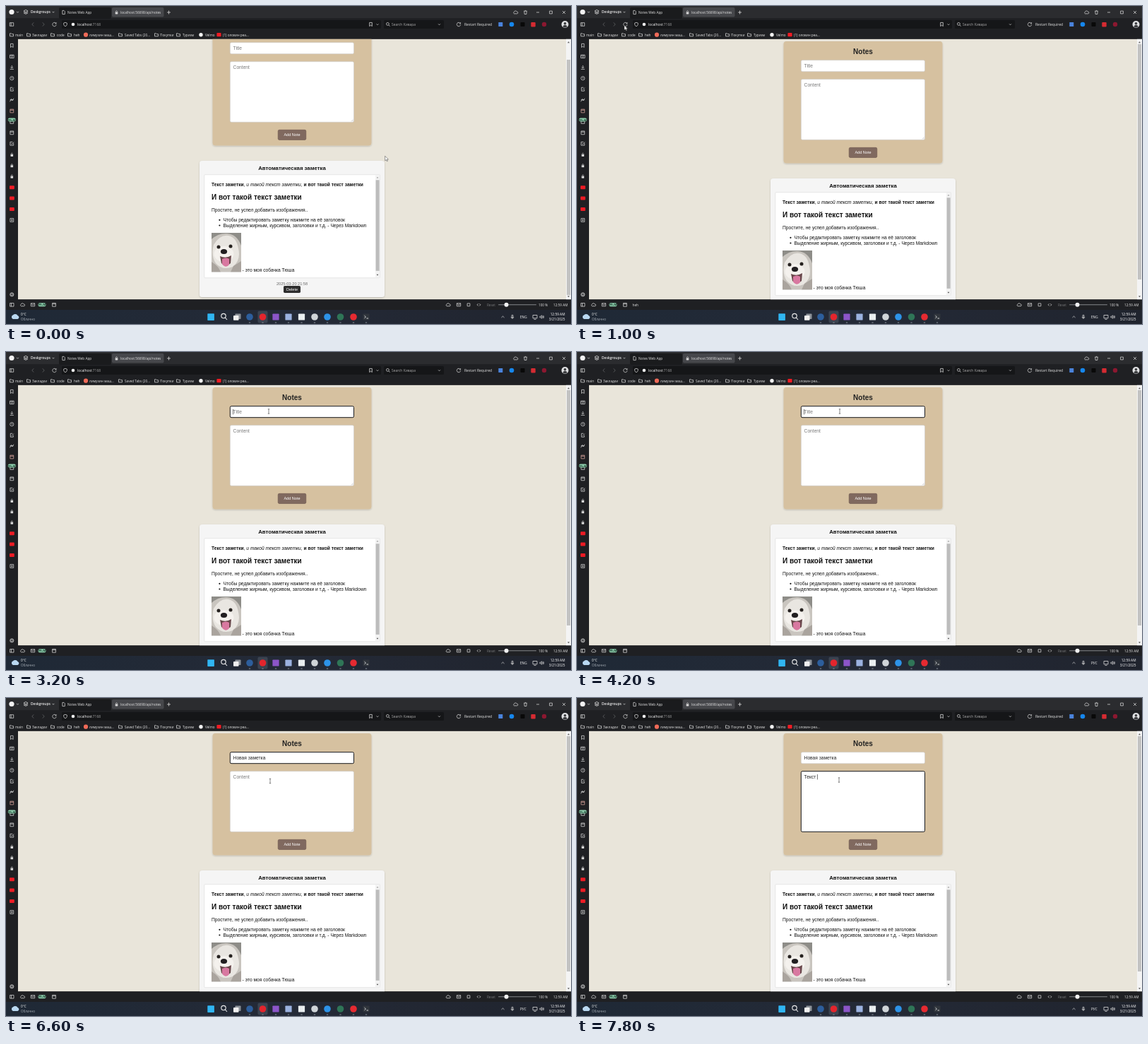
These frames come from a looping animation (800x450 px, 8 s). An HTML page:

```html
<!DOCTYPE html>
<html lang="ru">
<head>
<meta charset="utf-8">
<title>Notes Web App</title>
<style>
  html, body { margin: 0; width: 100%; height: 100%; overflow: hidden; background: #1e1f22; }
  svg { display: block; width: 100vw; height: 100vh; }
  text { white-space: pre; }
  .ui { font-family: "Open Sans", "Noto Sans", sans-serif; }
  .pg { font-family: "Liberation Sans", Arial, sans-serif; }
</style>
</head>
<body>
<svg id="stage" viewBox="0 0 800 450"></svg>
<script>
const LOOP = 8000, STEP = 200;
const stage = document.getElementById('stage');
const INK = '#d8d8d8';

const rect = (x, y, w, h, fill, r = 0, more = '') =>
  `<rect x="${x}" y="${y}" width="${w}" height="${h}" fill="${fill}" rx="${r}" ${more}/>`;
const dot = (x, y, r, fill, more = '') => `<circle cx="${x}" cy="${y}" r="${r}" fill="${fill}" ${more}/>`;
const line = (d, color = INK, w = 0.8, more = '') =>
  `<path d="${d}" fill="none" stroke="${color}" stroke-width="${w}" ${more}/>`;
const text = (cls, x, y, size, fill, str, more = '') =>
  `<text class="${cls}" x="${x}" y="${y}" font-size="${size}" fill="${fill}" ${more}>${str}</text>`;
const ui = (x, y, str, size = 4.75, fill = '#e4e4e4', more = '') => text('ui', x, y, size, fill, str, more);
const pg = (x, y, str, size = 6.667, fill = '#111', more = '') => text('pg', x, y, size, fill, str, more);
const BOLD = 'font-weight="bold"', MID = 'text-anchor="middle"';

// Small outline icons, centred on 0,0
const shapes = {
  folder: 'M-2.5 2V-2H-.5L.3-1.1H2.5V2Z',
  mark: 'M-1.8-2.6H1.8V2.6L0 1.1-1.8 2.6Z',
  panel: 'M-2.7-2.3H2.7V2.3H-2.7ZM-.8-2.3V2.3',
  book: 'M-2.8-2.2H2.8V2.2H-2.8ZM0-2.2V2.2M-1.9-.8H-.9M.9-.8H1.9',
  down: 'M0-2.8V1M-1.8-.6L0 1.2 1.8-.6M-2.6 2.6H2.6',
  clock: 'M2.6 0A2.6 2.6 0 1 1-2.6 0 2.6 2.6 0 1 1 2.6 0M0-1.5V0L1 .7',
  edit: 'M1-2.4H-2V2.6H2V.2M-.4 1L2.6-2',
  wave: 'M-2.8 2.2L-.8-1.6.4.9 2.6-2.4M-2.6-.3H2.4',
  box: 'M-2.4-2.4H2.4V2.4H-2.4ZM-2.4-1.1H2.4',
  mail: 'M-2.7-2H2.7V2H-2.7ZM-2.7-2L0 .5 2.7-2',
  check: 'M2.4-.5V2.4H-2.4V-2.4H1M-1.2-.3L0 1 2.8-2.2',
  plus: 'M-2.4-2.4H2.4V2.4H-2.4ZM0-1.3V1.3M-1.3 0H1.3',
  cloud: 'M-2 1.9A1.5 1.5 0 0 1-1.9-.8 2 2 0 0 1 1.8-.9 1.4 1.4 0 0 1 2 1.9Z',
  bin: 'M-2.3-1.8H2.3M-1.7-1.8L-1.4 2.5H1.4L1.7-1.8M-.7-2.6H.7',
  lens: 'M1.3-.6A1.9 1.9 0 1 1-2.5-.6 1.9 1.9 0 1 1 1.3-.6M.8.9L2.6 2.7',
  shield: 'M0-2.7L2.3-1.9V.2Q2 2 0 2.8-2 2-2.3.2V-1.9Z',
  back: 'M1.2-2.6L-1.2 0 1.2 2.6',
  next: 'M-1.2-2.6L1.2 0-1.2 2.6',
  reload: 'M2.3-1.4A2.7 2.7 0 1 0 2.7.4M2.6-2.8V-1.1H.8',
  cross: 'M-2-2L2 2M2-2L-2 2',
  square: 'M-1.9-1.9H1.9V1.9H-1.9Z',
  min: 'M-2 0H2',
  caret: 'M-1.4-.6L0 .8 1.4-.6',
  up: 'M-2 .9L0-1 2 .9',
  code: 'M-.8-1.6L-2.4 0-.8 1.6M.8-1.6L2.4 0 .8 1.6',
  layers: 'M0-2.6L3-1 0 .6-3-1ZM-3 .5L0 2.1 3 .5M-3 1.9L0 3.4 3 1.9',
  page: 'M-1.6-2.6H.6L1.8-1.4V2.6H-1.6Z',
  mic: 'M-.9-2.6H.9V.4H-.9ZM-1.9 0Q-1.8 1.7 0 1.7 1.8 1.7 1.9 0M0 1.7V2.8',
  sound: 'M-2.6-.8H-1.4L.2-2.2V2.2L-1.4.8H-2.6ZM1.3-1.3Q2.2 0 1.3 1.3M2.3-2.1Q3.7 0 2.3 2.1',
  gear: 'M1.5 0A1.5 1.5 0 1 1-1.5 0 1.5 1.5 0 1 1 1.5 0M2.6 0A2.6 2.6 0 1 1-2.6 0 2.6 2.6 0 1 1 2.6 0'
};
const icon = (name, x, y, color = INK, w = 0.75) => line(shapes[name], color, w, `transform="translate(${x} ${y})"`);
const lock = (x, y) => rect(x - 1.8, y - .6, 3.6, 3, INK, .4) + line(`M${x - 1} ${y - .5}V${y - 1.6}Q${x} ${y - 3.2} ${x + 1} ${y - 1.6}V${y - .5}`, INK, .7);
const badge = (x, y) => rect(x - 5.5, y - 2.5, 11, 5, '#8fd0ae', 2.2) + ui(x, y + 1.5, '99+M', 4, '#16382a', `${MID} ${BOLD}`);

function topBar() {
  const marks = [[8, 13, 'main'], [32, 37, 'Закладки'], [66, 72, 'code'], [90, 96, 'heh'], [162, 168, 'Saved Tabs (20...'],
    [213, 218, 'Покупки'], [244, 250, 'Туризм']];
  return rect(0, 0, 800, 17.5, '#2b2c2f') + rect(0, 17.5, 800, 29, '#1f2023') +
    rect(75, 2, 74, 16, '#1a1b1d', 2) + rect(150, 2, 73.5, 13.5, '#46474b', 2) +
    dot(8, 8.5, 3.6, '#f2f2f2') + icon('caret', 16.5, 8.5) + icon('layers', 28, 8) +
    ui(35, 10.4, 'Deskgroups', 4.9, '#eee', 'font-weight="600"') + icon('caret', 67, 8.5) +
    icon('page', 81.5, 9) + ui(87, 10.7, 'Notes Web App') +
    lock(156.5, 9) + ui(162, 10.7, 'localhost:56698/api/notes') +
    line('M228 9H233M230.5 6.5V11.5') +
    icon('cloud', 721.5, 9) + icon('bin', 735.5, 9) + icon('min', 753, 9) + icon('square', 771.5, 9) + icon('cross', 790, 9) +
    rect(79, 20, 452, 12, '#151618', 1.5) + rect(535, 20, 85, 12, '#151618', 1.5) +
    icon('panel', 8, 26) + icon('back', 38, 26, '#66676a') + icon('next', 53, 26, '#66676a') + icon('reload', 68.5, 26) +
    icon('shield', 84, 26) + dot(95, 26, 2.3, '#eee') +
    ui(101, 27.8, '<tspan fill="#fff">localhost</tspan><tspan fill="#a2a2a2">:7168</tspan>', 4.9) +
    icon('mark', 516.5, 26, INK, .8) + icon('caret', 526, 26) +
    icon('lens', 541, 26) + ui(546, 27.8, 'Search Кивара', 4.9, '#aaa') + icon('caret', 613.5, 26) +
    icon('reload', 641, 26) + ui(649, 27.9, 'Restart Required', 5) +
    rect(697.3, 23, 6, 6, '#4a83dc', .6) + dot(716, 26, 3.3, '#1687ee') + rect(728.5, 23, 6, 6, '#090909', 1) +
    rect(743.3, 23, 6.4, 6.4, '#d52b32', 1) + dot(762, 26, 3.2, '#8b1830') +
    dot(791.5, 26, 5, '#dedfe1') + dot(791.5, 24.7, 1.8, '#3a3b3e') + '<path d="M788.2 29Q791.5 24.6 794.8 29Q791.5 32 788.2 29Z" fill="#3a3b3e"/>' +
    marks.map(([ix, x, s]) => icon('folder', ix, 40.8) + ui(x, 42.6, s, 4.7)).join('') +
    dot(113, 40.7, 3.1, '#ef6a58') + ui(118, 42.6, 'лимузин маш...', 4.7) +
    dot(276, 40.7, 2.7, '#f3f3f3') + ui(282, 42.6, 'Velmo', 4.7) +
    rect(298.4, 38.1, 6.2, 5.2, '#f01c24', 1) + ui(307, 42.6, '(1) оловин реа...', 4.7);
}

function sideBar() {
  const names = ['mark', 'book', 'down', 'clock', 'edit', 'wave', 'box', 'box', 'box', 'check'];
  let s = rect(0, 46.5, 17, 369, '#1f2023');
  names.forEach((n, i) => s += icon(n, 8.3, 56 + i * 15.42, i === 6 ? '#d9a59d' : INK));
  for (let i = 0; i < 3; i++) s += lock(8.3, 210.5 + i * 15.4) + rect(5, 254.2 + i * 15.4, 6.8, 5, '#ee1c25', 1);
  return s + icon('plus', 8.3, 303) + icon('gear', 8.3, 408.3) + badge(8.3, 161);
}

function bottomBars() {
  const apps = [[345, '#2d5e9c', 1], [363.5, '#e4252d', 1], [382, '#8c55c9', 0], [400, '#9bb2e0', 0], [418.5, '#e9eef0', 0],
    [437, '#cfd4d8', 1], [455, '#2d93e8', 1], [473.5, '#2f7557', 1], [492, '#e62a31', 1], [510, '#30353c', 0]];
  return rect(0, 415.5, 800, 14.5, '#1f2023') +
    icon('panel', 8.3, 422.8) + icon('cloud', 23.3, 422.8) + icon('mail', 38, 422.8) + badge(51, 422.8) + icon('box', 68, 422.8) +
    icon('cloud', 626, 422.8) + icon('mail', 641, 422.8) + icon('square', 655, 422.8) + icon('code', 669.5, 422.8) +
    ui(681, 424.6, 'Reset', 4.6, '#77787a') + rect(697, 422.2, 54, 1.1, '#85878a', .5) + dot(708.5, 422.8, 3, '#f2f2f2') +
    ui(754, 424.6, '100 %', 4.7) + ui(775, 424.6, '12:59 AM', 4.7) +
    rect(0, 430, 800, 20, 'url(#task)') +
    '<path d="M10 443A3 3 0 0 1 10 437.3 4 4 0 0 1 16.5 438 2.6 2.6 0 0 1 16.5 443Z" fill="#b9d8f1"/>' +
    ui(21, 438.2, '0°C', 4.7, '#fff') + ui(21, 444.7, 'Облачно', 4.6, '#a9b0b8') +
    rect(285.3, 435.3, 9.6, 9.6, '#30b5f2', .6) +
    line('M311.2 438.6A3.2 3.2 0 1 1 304.8 438.6 3.2 3.2 0 1 1 311.2 438.6M310.3 441L313 444', '#eee', 1.1) +
    rect(324.5, 435.5, 8, 7.5, '#8c9299', .8) + rect(322, 438, 7.5, 6.7, '#f0f0f0', .8) +
    rect(356.5, 431.5, 14, 17, '#3b4350', 2) +
    apps.map(([x, c, round]) => (round ? dot(x, 440, 4.8, c) : rect(x - 4.6, 435.4, 9.2, 9.2, c, .9)) +
      rect(x - 1.3, 447.6, 2.6, .9, '#8b929c', .4)).join('') +
    line('M507.5 438.2L509.4 440 507.5 441.8M510.5 442H513', '#fff', .8) +
    icon('up', 703.5, 440) + icon('mic', 717, 440) +
    `<text id="lang" class="ui" x="728" y="441.9" font-size="4.7" fill="#fff"></text>` +
    line('M746 437.5H752V441.8H746ZM747.5 443.4H750.5', INK, .8) + icon('sound', 758.5, 440) +
    ui(791.5, 438.2, '12:59 AM', 4.8, '#fff', 'text-anchor="end"') + ui(791.5, 444.8, '3/21/2025', 4.8, '#fff', 'text-anchor="end"') +
    `<text id="status" class="ui" x="78.5" y="424.5" font-size="4.7" fill="#e4e4e4"></text>`;
}

function photo() {
  return '<g transform="translate(291 346)" clip-path="url(#snap)">' + rect(0, 0, 42, 55.5, '#8e8d88') +
    '<path d="M0 9Q10 0 22 1 36 2 42 18V55H0Z" fill="#c9c5bf"/>' +
    '<path d="M3 17Q12 2 24 4 35 6 38 22 42 39 30 48 16 54 6 43-1 32 3 17Z" fill="#e9e6e1"/>' +
    '<ellipse cx="17.5" cy="30" rx="14" ry="11" fill="#f4f1ed"/>' +
    '<path d="M0 41Q10 47 13 55.5H0ZM31 47L42 40V55.5H27Z" fill="#aaa49e"/>' +
    '<path d="M12 33Q20 37 28 32L27 43Q20 50 14 43Z" fill="#69474b"/>' +
    '<path d="M15 37Q21 34 25 37L25 45Q20 51 15 44Z" fill="#d878a0"/>' +
    dot(10, 20, 2.5, '#25211f') + dot(27, 19, 2.5, '#25211f') +
    '<ellipse cx="17.5" cy="26.5" rx="4.6" ry="3.5" fill="#211e20"/></g>';
}

function page() {
  const field = (id, y, h) => rect(317.3, y, 175.2, h, '#fff', 1.8, `id="${id}" stroke="#ccc" stroke-width=".6"`);
  const label = (id, y) => `<text id="${id}" class="pg" x="321.6" y="${y}" font-size="6.667"></text>`;
  return `<g clip-path="url(#view)">${rect(17, 46.5, 776, 369, '#e9e5da')}<g id="scroll">` +
    rect(292.5, 50, 225, 172.5, '#d6c1a0', 4, 'filter="url(#soft)"') +
    pg(405, 67.6, 'Notes', 10, '#222', `${BOLD} ${MID}`) +
    field('box1', 76.7, 16) + field('box2', 103.7, 85.6) + label('text1', 87) + label('text2', 113.9) +
    line('M489 188.2L491.6 185.6M490.6 188.2L491.6 187.2', '#888', .4) +
    rect(385.2, 200.3, 39.6, 14.2, '#80695f', 1.8, 'stroke="#6c574e" stroke-width=".6"') +
    pg(405, 209.3, 'Add Note', 5.55, '#fff', MID) +
    rect(274, 244, 262, 193, '#f5f5f5', 4, 'filter="url(#soft)"') +
    pg(405, 257.2, 'Автоматическая заметка', 7.8, '#111', `${BOLD} ${MID}`) +
    rect(280.8, 263.7, 248.7, 146, '#fff', 1, 'stroke="#d8d8d8" stroke-width=".6"') +
    rect(523, 264.2, 6.2, 145, '#f3f3f3') + rect(523.6, 271.3, 5, 128.5, '#bcbcbc') +
    '<path d="M524.6 268.6L526 266.8 527.4 268.6Z" fill="#999"/><path d="M524.6 404.8L526 406.6 527.4 404.8Z" fill="#444"/>' +
    pg(291, 280.1, '<tspan font-weight="bold">Текст заметки</tspan>, <tspan font-style="italic">и такой текст заметки</tspan>, <tspan font-weight="bold">и вот такой текст заметки</tspan>') +
    pg(291, 299.4, 'И вот такой текст заметки', 10, '#111', BOLD) +
    pg(291, 315.9, 'Простите, не успел добавить изображения..') +
    dot(302.4, 327.8, 1.1, '#111') + dot(302.4, 335.5, 1.1, '#111') +
    pg(307.6, 330, 'Чтобы редактировать заметку нажмите на её заголовок') +
    pg(307.6, 337.7, 'Выделение жирным, курсивом, заголовки и т.д. - Через Markdown') +
    photo() + pg(334.6, 401.4, '- это моя собачка Тюша') +
    pg(405, 419.6, '2025-03-20 21:58', 5.6, '#666', MID) +
    rect(393, 420.9, 24, 10.2, '#2e2e2e', 1.8) + pg(405, 428, 'Delete', 5.55, '#fff', MID) +
    '<path id="bar" stroke="#111" stroke-width=".6"/></g></g>' +
    rect(793, 46.5, 7, 369, '#f4f4f4') + rect(794, 0, 5, 333, '#c2c2c2', 0, 'id="thumb"') +
    '<path d="M795 52.2L796.5 50.2 798 52.2Z" fill="#555"/><path d="M795 410.2L796.5 412.2 798 410.2Z" fill="#555"/>';
}

stage.innerHTML = `<defs>
  <clipPath id="view"><rect x="17" y="46.5" width="776" height="369"/></clipPath>
  <clipPath id="snap"><rect width="42" height="55.5"/></clipPath>
  <linearGradient id="task"><stop offset="0" stop-color="#1f2936"/><stop offset=".5" stop-color="#242a37"/><stop offset="1" stop-color="#20242e"/></linearGradient>
  <filter id="soft" x="-5%" y="-5%" width="110%" height="112%"><feDropShadow dx="0" dy="1" stdDeviation="1.3" flood-opacity=".2"/></filter>
</defs>` + page() + topBar() + sideBar() + bottomBars() +
  '<path id="arrow" d="M0 0V6.6L1.6 5.2 2.7 7.5 3.7 7 2.7 4.8H4.7Z" fill="#fff" stroke="#333" stroke-width=".5"/>' +
  '<path id="beam" d="M-1.2-3.2H1.2M0-3.2V3.2M-1.2 3.2H1.2" stroke="#333" stroke-width=".6"/>';

const el = {};
stage.querySelectorAll('[id]').forEach(n => el[n.id] = n);
const set = (n, attrs) => { for (const k in attrs) n.setAttribute(k, attrs[k]); };

// Pointer keys: time, x, y
const pointer = [[0, 536.7, 212.3], [200, 536.7, 212.3], [400, 490, 190], [600, 300, 112], [800, 97, 38], [1000, 67, 27.5],
  [2400, 67, 27.5], [2600, 130, 43], [2800, 300, 76], [3000, 372, 84], [6200, 372, 84], [6600, 374, 117.5],
  [7000, 371, 116], [8000, 371, 116]];

function pointerAt(t) {
  const i = Math.max(1, pointer.findIndex(k => k[0] >= t));
  const [t0, x0, y0] = pointer[i - 1], [t1, x1, y1] = pointer[i];
  const p = (t - t0) / (t1 - t0);
  return [x0 + (x1 - x0) * p, y0 + (y1 - y0) * p];
}

// Letters typed by time t, from [time, count] keys
const typed = (str, keys, t) => str.slice(0, keys.reduce((n, [at, count]) => t >= at ? count : n, 0));

function fill(node, str, hint) {
  node.textContent = str || hint;
  node.setAttribute('fill', str ? '#222' : '#7b7b7b');
}

function draw(t) {
  const scroll = t < 200 ? -25 : t < 400 ? -3.2 : 0;
  el.scroll.setAttribute('transform', `translate(0 ${scroll})`);
  el.thumb.setAttribute('y', 54 - scroll * .88);

  const title = typed('Новая заметка', [[4800, 1], [5000, 3], [5200, 5], [5400, 7], [5600, 9], [5800, 11], [6000, 13]], t);
  const body = typed('Текст ', [[7400, 1], [7600, 3], [7800, 6]], t);
  fill(el.text1, title, 'Title');
  fill(el.text2, body, 'Content');

  const focus = t < 3200 ? 0 : t < 7000 ? 1 : 2;
  [1, 2].forEach(i => set(el['box' + i], focus === i
    ? { stroke: '#17181c', 'stroke-width': 1 } : { stroke: '#ccc', 'stroke-width': .6 }));
  const caretOn = focus === 2 || focus === 1 && t < 6400;
  const value = focus === 2 ? body : title;
  const x = 321.6 + (value ? el['text' + focus].getComputedTextLength() + .2 : 0);
  el.bar.setAttribute('d', caretOn ? `M${x} ${focus === 2 ? 108 : 81}v7.4` : '');

  el.lang.textContent = t < 4200 ? 'ENG' : 'РУС';
  el.status.textContent = t >= 800 && t < 1400 ? 'heh' : '';

  const [mx, my] = pointerAt(t);
  const inField = t >= 2800;
  set(el.arrow, { transform: `translate(${mx} ${my})`, visibility: inField ? 'hidden' : 'visible' });
  set(el.beam, { transform: `translate(${mx} ${my})`, visibility: inField ? 'visible' : 'hidden' });
}

const start = performance.now();
function tick() {
  const t = (performance.now() - start) % LOOP;
  draw(Math.floor(t / STEP) * STEP);
  requestAnimationFrame(tick);
}
tick();
</script>
</body>
</html>
```
